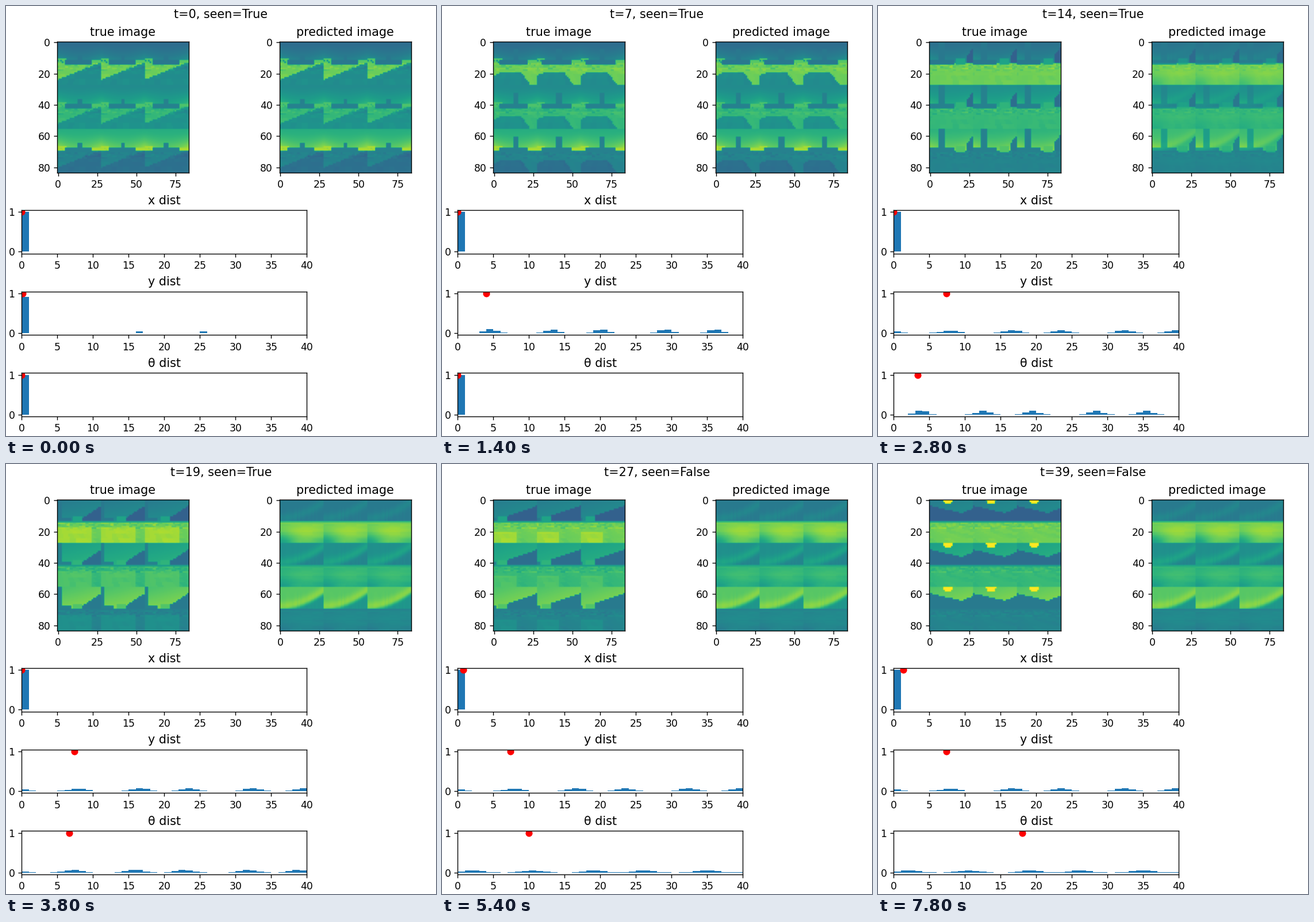
A matplotlib script for the animation above (8000 ms loop, 748 px wide and 748 px high).

```python
import math

import numpy as np
import matplotlib.pyplot as plt
from matplotlib.animation import FuncAnimation

SIZE = 748
STEPS = 40
SEEN_STEPS = 25
TILE = 28

# Three views side by side, each sampled a third of a pixel further right
col = np.arange(3 * TILE)
U, V = np.meshgrid(col % TILE + 0.5 + (col // TILE - 1) / 3,
                   np.arange(TILE) + 0.5)
NOISE = np.random.default_rng(4).normal(0, 1, (64, 64))
FLOOR = V > 14

# Brightness of each material in the red, green and blue rows
GROUND = (0.78, 0.67, 0.45)
SHADE = (0.49, 0.51, 0.37)
PATCH = (0.86, 0.72, 0.50)
ROCK = (0.31, 0.36, 0.41)
WALL = (0.40, 0.44, 0.44)
SCRUB = (0.74, 0.72, 0.87)
MOUND = (0.58, 0.65, 0.73)


def ease(a):
    a = np.clip(a, 0, 1)
    return a * a * (3 - 2 * a)


def pose(t):
    """Walk forward, turn, step sideways, then turn on."""
    x = 0.15 * np.clip(t - 22, 0, 9)
    y = 0.1 + 7.3 * ease(t / 13.3)
    theta = (np.clip(t - 9, 0, 15) + max(t - 27, 0)) * 2 / 3
    return x, y, theta


def fill(img, mask, values):
    for channel, value in zip(img, values):
        channel[mask] = value


def sky(rot):
    turned = ease((rot - 2) / 10)
    low = np.clip(V / 13, 0, 1)
    ahead = low ** 1.6 * (0.65 + 0.5 * ((U - 14) / 14) ** 2)
    aside = 0.4 + 0.25 * U / TILE + 0.35 * low
    glow = ahead + (aside - ahead) * turned
    return np.array([0.35 + 0.16 * glow, 0.48 + 0.18 * glow,
                     0.62 + 0.23 * glow])


def ridge(rot):
    """Skyline: one long hill whose top pans in, then a second behind it."""
    peak = 28 - 4 * max(rot - 20, 0)
    rise = 0.65 * math.exp(-0.13 * (rot - 10))
    first = (4.2 + rise * np.maximum(peak - U, 0)
             + 0.23 * np.maximum(U - peak, 0))
    second = 9 - 0.4 * (U - 20 - 4 * (27 - rot))
    start = 16 - 1.6 * (rot - 10)
    return np.where(U > start, np.minimum(first, second), 15)


def shadow(t):
    """Upper edge of the shaded ground, a slope that closes into a dome."""
    left = 5 + 21 * ease(1 - t / 4)
    right = 15 + 13 * math.exp(-t / 4)
    top = 14.3 + 5.7 * ease(t / 4) + 3 * max(t - 10, 0)
    return (top + 0.4 * np.maximum(left - U, 0)
            + 1.3 * np.maximum(U - right, 0))


def texture(y, rot):
    depth = 14 / np.maximum(V - 13.2, 0.4)
    row = np.floor(depth * 2.2 + y).astype(int) % 64
    lateral = np.floor((U - 14 + 1.4 * rot) * np.sqrt(depth) / 4)
    return NOISE[row, lateral.astype(int) % 64] * np.where(V < 19, 0.03, 0.01)


def scene(t):
    _, y, theta = pose(t)
    rot = theta * 1.5
    X = U + 1.35 * rot
    img = sky(rot)

    if rot > 13:
        lift = 0.14 if t > 32 else 0.45
        sun = np.hypot(U - 19.9 + 1.21 * (t - 32), V + 0.8 - lift * (t - 32))
        fill(img, sun < 3.2, (1, 1, 1))

    fill(img, (V > ridge(rot)) & (V < 15), ROCK)
    fill(img, FLOOR, GROUND)

    if 5 < rot < 18:
        right, top = 22 - 1.5 * (rot - 10), 18 + 0.6 * (rot - 10)
        fill(img, (U < right) & (V > top), PATCH)
    if t < 14:
        fill(img, FLOOR & (V > shadow(t)), SHADE)
    fade = np.array([1, 0.9, 0.6])[:, None, None]
    img += np.where(FLOOR, texture(y, rot), 0) * fade

    # Distant scrub, then the low wall with its tower
    rough = NOISE[V.astype(int), X.astype(int) % 64]
    scrub = (X < 5.5) & (V > 11) & (rough > -0.8)
    scrub |= (X > 21) & (X < 28.5) & (V > 12) & (rot < 3)
    fill(img, scrub & ~FLOOR, SCRUB)
    wall = (X > 5 - 0.4 * y) & (X < 22) & (V > 12) & (V < 15)
    tall = 52 / (10 - min(y, 8))
    wall |= (abs(X - 14) < 1.3 + 0.09 * y) & (V > 14 - tall) & (V < 15)
    fill(img, wall, WALL)

    if rot > 3:
        edge = 16 - 1.4 * (rot - 10)
        fill(img, (abs(U - edge + 3) < 3) & (V > 10.8) & (V < 15), MOUND)
    if rot > 8:
        fill(img, (V > 14) & (V < 15), (0.58, 0.56, 0.43))
    return np.clip(img, 0, 1)


def soft_scene(t):
    """Smooth average view that the model falls back to."""
    crest = 13.8 - 9.5 * (np.clip(U + 0.3 * (24 - t), 0, 40) / TILE) ** 2
    under = ease((V - crest) / 4 + 0.2)
    band = np.exp(-((V - crest + 1.5) / 3) ** 2)
    streak = NOISE[3, U.astype(int) % 64] * np.clip(V / 14, 0, 1) * 0.008
    img = np.array([a + (b - a) * under + c * band + streak for a, b, c in
                    ((0.41, 0.41, 0.05), (0.50, 0.45, 0.08),
                     (0.74, 0.52, 0.08))])

    warm = np.exp(-((U - 16) / 15) ** 2 - ((V - 20) / 5) ** 2)
    corner = np.exp(-(U / 9) ** 2 - ((V - 28) / 6) ** 2)
    corner += 0.4 * np.exp(-((U - 28) / 7) ** 2 - ((V - 28) / 4) ** 2)
    rise = np.clip((V - 13.5) / 2, 0, 1)
    grain = 0.006 * NOISE[V.astype(int), (U / 7).astype(int)]
    lower = np.array([a + (b - a) * rise + w * warm - c * corner + grain
                      for a, b, w, c in ((0.56, 0.77, 0.08, 0.20),
                                         (0.53, 0.64, 0.05, 0.09),
                                         (0.41, 0.46, 0.02, 0.04))])
    return np.where(FLOOR, lower, img)


def predicted(t):
    t = min(t, SEEN_STEPS - 1)
    w = ease((t - 11) / 7)
    return scene(t) * (1 - w) + soft_scene(t) * w


def stack(img):
    return img.reshape(3 * TILE, 3 * TILE)


def belief(p):
    """Five wrapped Gaussian bumps on 40 bins, wider as p grows."""
    main = 0.2 + 0.8 * math.exp(-1.2 * p)
    twin = min((1 - main) / 2, 0.2)
    side = (1 - main - 2 * twin) / 2
    sigma = min(0.05 + 0.3 * p, 0.4 + 0.1 * p)
    bumps = ((0.5, main), (9.2, side), (16.1, twin), (25, twin), (32.1, side))
    bars = np.zeros(40)
    for offset, weight in bumps:
        for turn in (-40, 0, 40):
            cdf = [math.erf((e - p - offset - turn) / (sigma * 2 ** 0.5)) / 2
                   for e in range(41)]
            bars += weight * np.diff(cdf)
    return bars


def add_axes(x, y, w, h, title):
    ax = fig.add_axes([x / SIZE, 1 - (y + h) / SIZE, w / SIZE, h / SIZE])
    ax.set_title(title)
    return ax


fig = plt.figure(figsize=(6, 6), dpi=SIZE / 6)
heading = fig.suptitle("", x=0.4997, y=1 - 5.2 / SIZE, va="top")

pictures = []
for left, name in ((89.3, "true image"), (476.1, "predicted image")):
    ax = add_axes(left, 61.9, 228.4, 228.4, name)
    pictures.append(ax.imshow(np.zeros((84, 84)), vmin=0, vmax=1))
    ax.set_xticks(range(0, 84, 25))
    ax.set_yticks(range(0, 84, 20))

charts = []
for row, name in enumerate("xyθ"):
    ax = add_axes(27.4, 354.9 + 141.7 * row, 495.8, 75.8, f"{name} dist")
    bars = ax.bar(np.arange(40) + 0.5, np.zeros(40), width=1)
    dot, = ax.plot([0], [1], "ro")
    ax.set(xlim=(0, 40), ylim=(-0.05, 1.05),
           xticks=range(0, 41, 5), yticks=[0, 1])
    charts.append((bars, dot))


def update(t):
    heading.set_text(f"t={t}, seen={t < SEEN_STEPS}")
    pictures[0].set_data(stack(scene(t)))
    pictures[1].set_data(stack(predicted(t)))
    _, y, theta = pose(min(t, SEEN_STEPS - 1))
    for (bars, dot), place, centre in zip(charts, pose(t), (0, y, theta)):
        dot.set_xdata([place])
        for bar, height in zip(bars, belief(centre)):
            bar.set_height(height)
    return []


anim = FuncAnimation(fig, update, frames=STEPS, interval=200, repeat=True,
                     repeat_delay=0, init_func=lambda: update(0))
plt.show()
```
